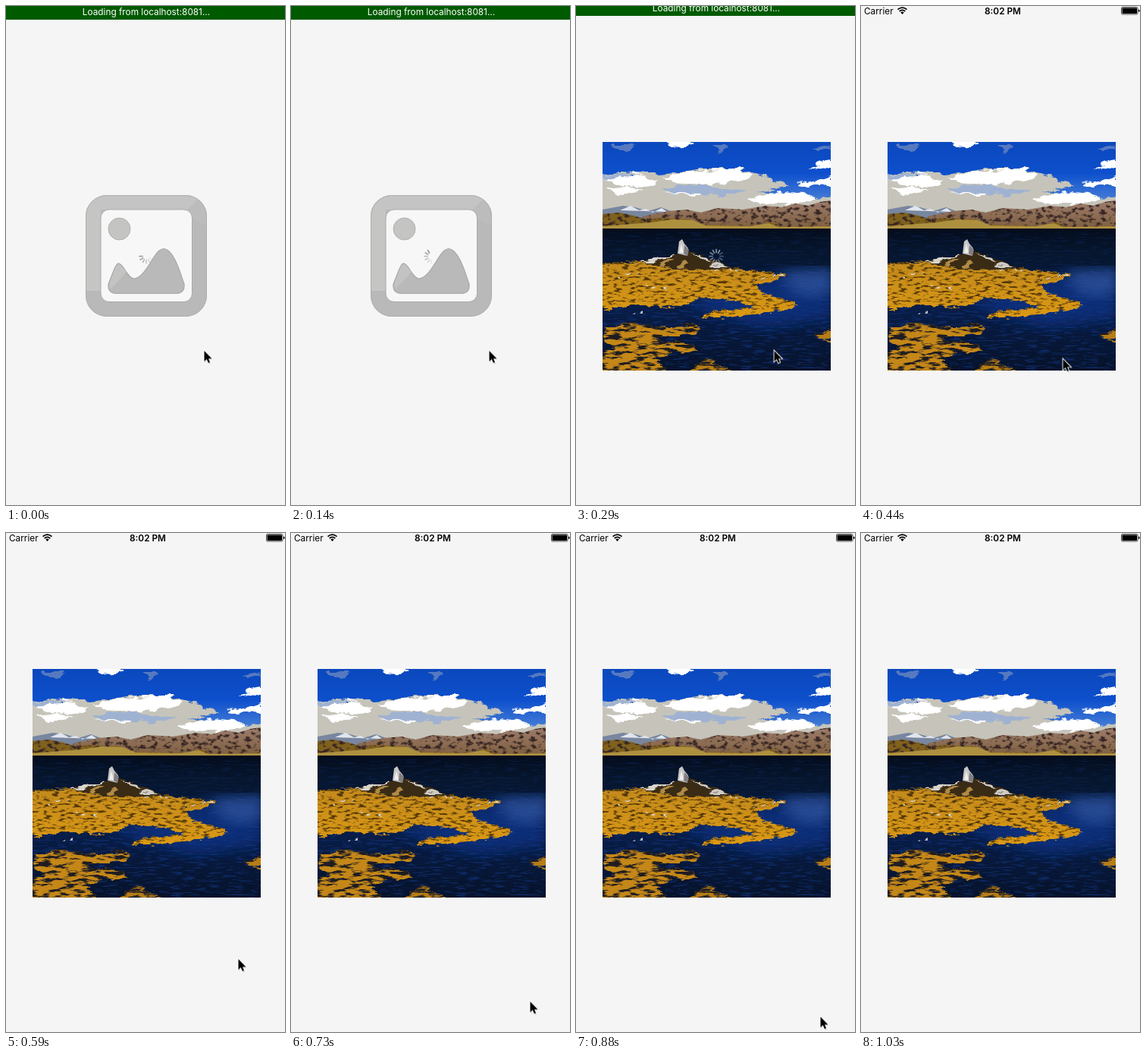
An HTML page for the animation above (1.6 s loop, 368 by 657 pixels).

```html
<!DOCTYPE html>
<html lang="en">
<head>
<meta charset="utf-8">
<title>Image loading</title>
<style>
  html, body { margin: 0; width: 100%; height: 100%; overflow: hidden; background: #f5f5f5; }
  svg { display: block; width: 100%; height: 100%; }
  text { font-family: Inter, Roboto, sans-serif; }

  .bar, .placeholder, .photo, .status, .spin, .cursor { animation: 1600ms step-end infinite; }
  .bar { animation-name: bar; }
  .placeholder { animation-name: placeholder; }
  .photo { animation-name: photo; }
  .status { animation-name: status; }
  .spin0 { animation-name: spin0; }
  .spin1 { animation-name: spin1; }
  .spin2 { animation-name: spin2; }
  .cursor { animation-name: cursor; }

  @keyframes bar {
    0% { transform: translateY(0); }
    18.125% { transform: translateY(-5px); }
    27.5%, 100% { transform: translateY(-30px); }
  }
  @keyframes placeholder { 0% { opacity: 1; } 18.125%, 100% { opacity: 0; } }
  @keyframes photo { 0% { opacity: 0; } 18.125%, 100% { opacity: 1; } }
  @keyframes status { 0% { opacity: 0; } 27.5%, 100% { opacity: 1; } }
  @keyframes spin0 { 0% { opacity: 1; } 8.75%, 100% { opacity: 0; } }
  @keyframes spin1 { 0% { opacity: 0; } 8.75% { opacity: 1; } 18.125%, 100% { opacity: 0; } }
  @keyframes spin2 { 0% { opacity: 0; } 18.125% { opacity: 1; } 27.5%, 100% { opacity: 0; } }
  @keyframes cursor {
    0% { transform: translate(261px, 453.5px); opacity: 1; }
    27.5% { transform: translate(266px, 464.5px); opacity: 1; }
    36.875% { transform: translate(306px, 560.5px); opacity: 1; }
    45.625% { transform: translate(315px, 616.5px); opacity: 1; }
    55% { transform: translate(322px, 636.5px); opacity: 1; }
    64.375%, 100% { transform: translate(322px, 636.5px); opacity: 0; }
  }
</style>
</head>
<body>
<svg viewBox="0 0 368 657" preserveAspectRatio="none">
  <defs>
    <clipPath id="frame"><rect x="35.5" y="179.5" width="300" height="300"/></clipPath>
    <clipPath id="outer"><rect x="105" y="249" width="160" height="160" rx="28"/></clipPath>
    <linearGradient id="sky" x2="0" y2="1">
      <stop offset="0" stop-color="#0b48bd"/>
      <stop offset=".35" stop-color="#0d4fcc"/>
      <stop offset=".6" stop-color="#3a74d4"/>
      <stop offset="1" stop-color="#8fb0dc"/>
    </linearGradient>
    <linearGradient id="lake" x2="0" y2="1">
      <stop offset="0" stop-color="#040c1c"/>
      <stop offset=".15" stop-color="#06152c"/>
      <stop offset=".55" stop-color="#081d48"/>
      <stop offset="1" stop-color="#06122a"/>
    </linearGradient>
    <linearGradient id="hills" x2="0" y2="1">
      <stop offset="0" stop-color="#9c7c6c"/>
      <stop offset="1" stop-color="#80603f"/>
    </linearGradient>
    <linearGradient id="meadow" x2="0" y2="1">
      <stop offset="0" stop-color="#c38a1c"/>
      <stop offset="1" stop-color="#dc9a14"/>
    </linearGradient>
    <filter id="rough" color-interpolation-filters="sRGB">
      <feTurbulence type="fractalNoise" baseFrequency=".06 .12" numOctaves="3" seed="4"/>
      <feDisplacementMap in="SourceGraphic" scale="12" xChannelSelector="R" yChannelSelector="G"/>
    </filter>
    <filter id="rock" color-interpolation-filters="sRGB">
      <feTurbulence type="fractalNoise" baseFrequency=".13 .2" numOctaves="3" seed="8"/>
      <feColorMatrix values="0 0 0 0 .22  0 0 0 0 .15  0 0 0 0 .14  5 0 0 0 -2.5"/>
      <feComposite in2="SourceAlpha" operator="in" result="spots"/>
      <feMerge><feMergeNode in="SourceGraphic"/><feMergeNode in="spots"/></feMerge>
    </filter>
    <filter id="grass" color-interpolation-filters="sRGB">
      <feTurbulence type="fractalNoise" baseFrequency=".1 .32" numOctaves="4" seed="12" result="noise"/>
      <feDisplacementMap in="SourceGraphic" in2="noise" scale="10" xChannelSelector="R" yChannelSelector="G" result="shape"/>
      <feColorMatrix in="noise" values="0 0 0 0 .32  0 0 0 0 .21  0 0 0 0 .03  0 5 0 0 -2.6"/>
      <feComposite in2="shape" operator="in" result="spots"/>
      <feMerge><feMergeNode in="shape"/><feMergeNode in="spots"/></feMerge>
    </filter>
    <filter id="marsh" color-interpolation-filters="sRGB">
      <feTurbulence type="fractalNoise" baseFrequency=".05 .2" numOctaves="4" seed="21" result="noise"/>
      <feDisplacementMap in="SourceGraphic" in2="noise" scale="14" xChannelSelector="R" yChannelSelector="G" result="shape"/>
      <feColorMatrix in="noise" values="0 0 0 0 .12  0 0 0 0 .11  0 0 0 0 .13  0 8 0 0 -3.9"/>
      <feComposite in2="shape" operator="in" result="spots"/>
      <feMerge><feMergeNode in="shape"/><feMergeNode in="spots"/></feMerge>
    </filter>
    <filter id="ripples" color-interpolation-filters="sRGB">
      <feTurbulence type="fractalNoise" baseFrequency=".06 .45" numOctaves="3" seed="5"/>
      <feColorMatrix values="0 0 0 0 .08  0 0 0 0 .23  0 0 0 0 .55  5 0 0 0 -2.6"/>
      <feComposite in2="SourceAlpha" operator="in"/>
    </filter>
    <filter id="soft"><feGaussianBlur stdDeviation="9"/></filter>
  </defs>

  <rect width="368" height="657" fill="#f5f5f5"/>

  <g class="placeholder">
    <g clip-path="url(#outer)">
      <rect x="105" y="249" width="160" height="160" fill="#b9b9b9"/>
      <path d="M105 249H259L240 268H105z" fill="#c4c4c4"/>
      <path d="M105 265Q110 255 125 268V375H105z" fill="#c5c5c4"/>
      <path d="M240 268L259 250 266 262V290L245 280z" fill="#bcbcbc"/>
    </g>
    <rect x="105.5" y="249.5" width="159" height="159" rx="27.5" fill="none" stroke="#aeaeae"/>
    <rect x="125" y="268" width="120.5" height="121.5" rx="11" fill="#f7f7f7" stroke="#a9a9a9"/>
    <circle cx="149.5" cy="293.5" r="14.5" fill="#c4c4c3" stroke="#b0b0b0"/>
    <path d="M135 366C139 357 142 347 145 342Q148 336 152 341C158 347 162 359 169 359C182 358 192 332 201 323Q208 316 215 323C225 333 230 352 235 366Q236 378 225 378.500H145Q134 378 135 366z" fill="#b9b9b9" stroke="#a9a9a9" stroke-width="1.2"/>
    <path d="M136 366L145 343Q148 338 152 342L159 350 138 373z" fill="#c3c3c2"/>
  </g>

  <g class="photo" clip-path="url(#frame)">
    <rect x="35" y="179" width="301" height="116" fill="url(#sky)"/>
    <g filter="url(#rough)">
      <path d="M30 222L60 219 110 222 130 220 165 214 212 214 245 222 283 237 262 241 236 244 300 247 322 254 340 256V275H30z" fill="#c6c4ba"/>
      <path d="M45 182H78L66 193 52 189zM178 183H202L194 192zM310 190L336 183V190z" fill="#5679c0"/>
      <path d="M112 240L170 236 225 244 205 249 130 248zM36 222L90 220 60 228 36 230z" fill="#9fb2d2"/>
      <g fill="#fff">
        <path d="M122 178H156L145 185 128 186zM305 211L336 203V215zM293 234L336 225V236L305 238z"/>
        <path d="M36 230L62 226 76 221 110 230 102 238 65 237zM36 240L66 238 90 243 60 248z"/>
        <path d="M114 227L150 217 212 214 234 222 220 229 168 236 130 233z"/>
        <path d="M120 246L165 247 156 251zM228 256L268 242 298 246 318 253 290 262 245 260z"/>
      </g>
    </g>
    <path d="M35 268L62 263 78 265 95 270 112 265 128 271V288H35z" fill="#78869f"/>
    <path d="M58 269L72 263 83 269 92 267 101 272 113 266 120 271z" fill="#e1e5ed"/>
    <g filter="url(#rock)">
      <path d="M88 277L122 270 146 268 164 272 187 266 220 268 250 263 271 265 290 260 306 263 322 258 336 256V293H88z" fill="url(#hills)"/>
      <path d="M35 274L57 272 76 276 92 281 110 279 150 281 169 288 240 290 257 284 270 291H35z" fill="#80611d"/>
    </g>
    <path d="M99 285L126 281 154 282 171 289 230 290 254 286 267 291 336 290V293H35V290z" fill="#ae913f"/>
    <rect x="35" y="293" width="301" height="187" fill="url(#lake)"/>
    <path d="M282 350H336V410L245 424 175 403 142 389 190 376z" fill="#0c348c" opacity=".7" filter="url(#soft)"/>
    <rect x="35" y="298" width="301" height="50" filter="url(#ripples)" opacity=".2"/>
    <rect x="35" y="348" width="301" height="132" filter="url(#ripples)" opacity=".5"/>
    <path d="M270 350L340 346V374L312 384 284 374z" fill="#3c62ac" opacity=".55" filter="url(#soft)"/>

    <path d="M29 340L87 336 130 344 212 346 277 353 260 362 237 367 245 377 294 392 280 399 225 408 163 411 180 402 236 397 205 387 163 384 143 394 109 396 82 393 29 401z" fill="url(#meadow)" filter="url(#grass)"/>
    <g filter="url(#marsh)">
      <path d="M40 422L70 417 99 423 164 420 160 430 118 435 103 443 147 444 163 453 126 457 104 467 120 482H29V459L52 449 36 439z" fill="#c48718"/>
      <path d="M150 480L174 464 191 475 220 482zM314 436L340 423V439z" fill="#b77d17"/>
    </g>
    <g fill="none" stroke="#d4dae0" stroke-width="1.5" stroke-dasharray="3 5 7 11" filter="url(#rough)">
      <path d="M55 356L88 354M91 367L123 374M176 348L214 348M235 361L276 352M74 403L86 402"/>
    </g>
    <g filter="url(#rough)">
      <path d="M84 337L110 331 129 327 150 323 176 331 199 343 214 347 174 348 132 346 103 341z" fill="#3a2b15"/>
      <path d="M80 337L112 330 132 327 118 333 100 338z" fill="#d9d5cc"/>
      <path d="M108 341L122 333 128 335 116 343zM134 343L141 334 148 337 142 345z" fill="#b08a45"/>
      <path d="M152 326L172 331 180 338 166 333zM176 341L190 340 204 346 188 346z" fill="#cfccc6"/>
    </g>
    <path d="M134 326L136 310 140 307 143 313 148 319 147 329 139 327z" fill="#c6c6c7"/>
    <path d="M136 325L139 313 142 325z" fill="#f0eeeb"/>
    <path d="M143 315L149 321 147 329 142 326z" fill="#817e80"/>
  </g>

  <g id="spinners" stroke-width="1.7" stroke-linecap="round"></g>

  <g class="bar">
    <rect y="-10" width="368" height="28" fill="#005a00"/>
    <text x="185" y="12" font-size="11.8" text-anchor="middle" fill="#fff">Loading from localhost:8081...</text>
  </g>

  <g class="status">
    <text x="4" y="10.5" font-size="11.8">Carrier</text>
    <text x="187" y="10.5" font-size="11.8" font-weight="600" text-anchor="middle">8:02 PM</text>
    <path d="M48.5 4.7Q54.5 -.5 60.5 4.7M50.7 7Q54.5 3.7 58.3 7" fill="none" stroke="#000" stroke-width="1.7"/>
    <path d="M52.3 8.5Q54.5 6.7 56.7 8.500L54.5 11z"/>
    <rect x="343.5" y="1.5" width="21.5" height="9.5" rx="1.5" fill="none" stroke="#000" stroke-width=".7"/>
    <rect x="344.5" y="2.5" width="19.5" height="7.5" rx=".7"/>
    <path d="M366 4.5Q367.5 4.7 367.5 6.200T366 8z"/>
  </g>

  <g class="cursor">
    <path d="M1 1.500V16L4.5 13 7 18 9.5 17 7.3 12H11.500z" opacity=".2"/>
    <path d="M.5 .5V14.500L3.7 11.500 5.9 16.500 8.100 15.500 6 10.700H10.500z" stroke="#fff" stroke-width="1.8" paint-order="stroke"/>
  </g>
</svg>
<script>
  const spokes = (head, color, least, most, reach) =>
    Array.from({ length: 12 }, (_, i) => {
      const age = (head - i + 12) % 12;
      const alpha = least + (most - least) * Math.max(0, 1 - age / reach);
      return `<path d="M185 324.5V320.5" stroke="${color}" opacity="${alpha.toFixed(2)}"
        transform="rotate(${i * 30} 185 329.5)"/>`;
    }).join("");

  const spinners = [
    [9, "#8c8c8c", 0, 0.9, 6],
    [11, "#8c8c8c", 0, 0.9, 6],
    [1, "#c3cede", 0.3, 0.7, 12]
  ];
  document.getElementById("spinners").innerHTML = spinners
    .map((look, i) => `<g class="spin spin${i}">${spokes(...look)}</g>`)
    .join("");
</script>
</body>
</html>
```
